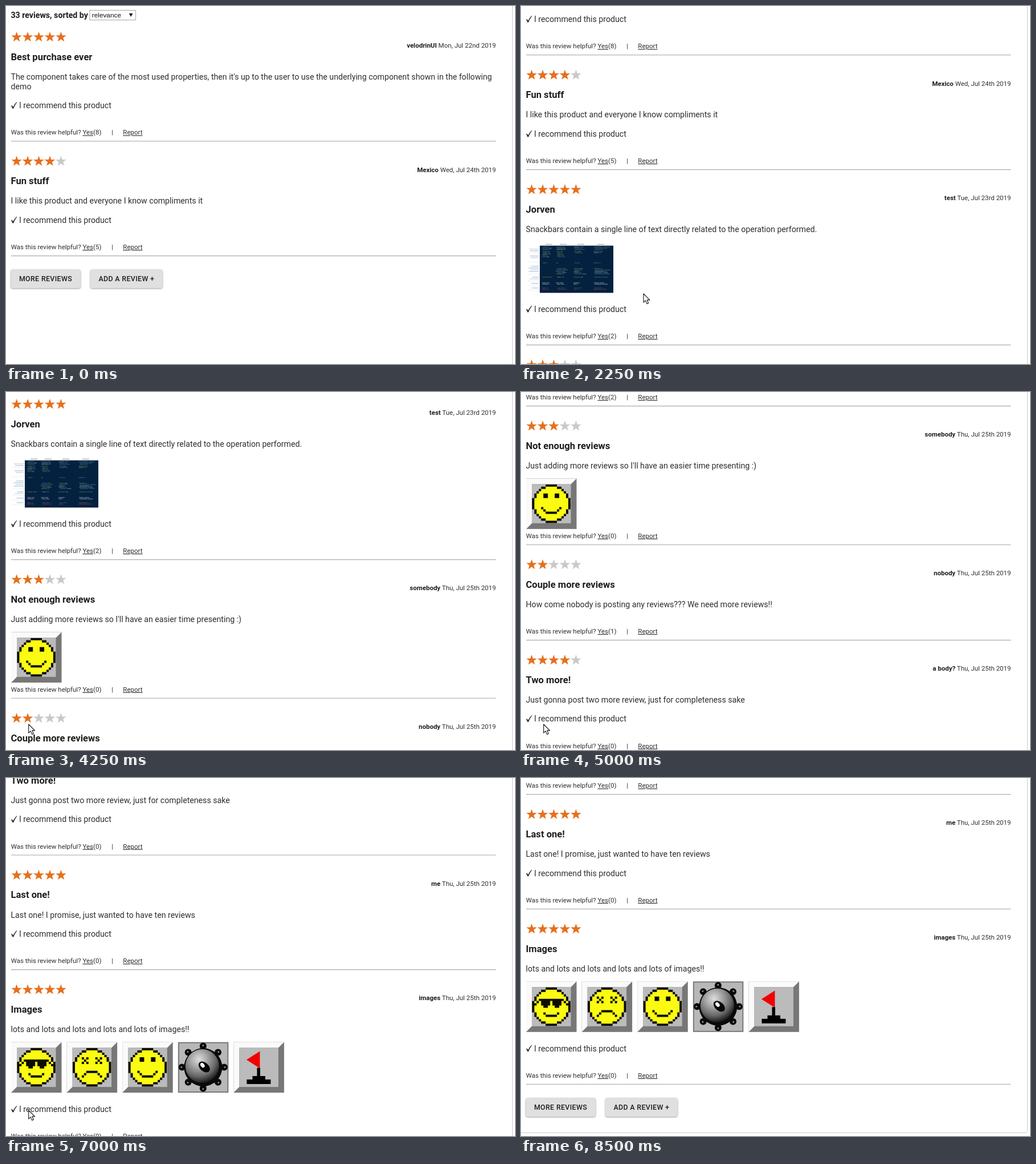
An HTML page that plays this animation: 893 px wide and 627 px high, repeating every 9.25 s.

```html
<!DOCTYPE html>
<html lang="en">
<head>
<meta charset="utf-8">
<title>Product reviews</title>
<style>
  html, body { margin: 0; width: 100%; height: 100%; overflow: hidden; background: #fff; }
  svg { display: block; }
  text { font: 14.17px Roboto, sans-serif; fill: #2e2e2e; }
  .bold { font-weight: 700; fill: #1e1e1e; }
  .head { font-size: 16.58px; }
  .small, .small tspan { font-size: 11.5px; }
  .link { text-decoration: underline; }
  .pick { font: 11.8px "Liberation Sans", Arial, sans-serif; fill: #111; }
  .label { font-size: 12.4px; font-weight: 500; letter-spacing: .354px; fill: #1e1e1e; }
  .btn { filter: drop-shadow(0 1.2px 1.4px rgba(0, 0, 0, .4)); }
</style>
</head>
<body>
<svg id="stage" width="893" height="627" viewBox="0 0 893 627">
  <defs>
    <radialGradient id="ball" cx=".4" cy=".3" r=".72">
      <stop offset="0" stop-color="#dedede"/>
      <stop offset=".35" stop-color="#a6a6a6"/>
      <stop offset=".7" stop-color="#686868"/>
      <stop offset="1" stop-color="#141414"/>
    </radialGradient>
  </defs>
  <g id="page"></g>
  <path id="cursor" d="M0 0V15.2L3.5 11.9L6 17.6L8.6 16.5L6.1 10.9H10.8Z"
    fill="#fff" stroke="#111" stroke-width="1.1" stroke-linejoin="round"/>
</svg>
<script>
const LOOP = 9250;
const ORANGE = '#e5701e', GREY = '#c9c9c9';

const reviews = [
  { stars: 5, head: 'Best purchase ever', who: 'velodrinUI', date: 'Mon, Jul 22nd 2019', ok: 1, yes: 8,
    body: ["The component takes care of the most used properties, then it's up to the user to use the underlying component shown in the following", 'demo'] },
  { stars: 4, head: 'Fun stuff', who: 'Mexico', date: 'Wed, Jul 24th 2019', ok: 1, yes: 5,
    body: ['I like this product and everyone I know compliments it'] },
  { stars: 5, head: 'Jorven', who: 'test', date: 'Tue, Jul 23rd 2019', ok: 1, yes: 2,
    body: ['Snackbars contain a single line of text directly related to the operation performed.'], pics: ['sheet'] },
  { stars: 3, head: 'Not enough reviews', who: 'somebody', date: 'Thu, Jul 25th 2019', ok: 0, yes: 0,
    body: ["Just adding more reviews so I'll have an easier time presenting :)"], pics: ['smile'] },
  { stars: 2, head: 'Couple more reviews', who: 'nobody', date: 'Thu, Jul 25th 2019', ok: 0, yes: 1,
    body: ['How come nobody is posting any reviews??? We need more reviews!!'] },
  { stars: 4, head: 'Two more!', who: 'a body?', date: 'Thu, Jul 25th 2019', ok: 1, yes: 0,
    body: ['Just gonna post two more review, just for completeness sake'] },
  { stars: 5, head: 'Last one!', who: 'me', date: 'Thu, Jul 25th 2019', ok: 1, yes: 0,
    body: ['Last one! I promise, just wanted to have ten reviews'] },
  { stars: 5, head: 'Images', who: 'images', date: 'Thu, Jul 25th 2019', ok: 1, yes: 0,
    body: ['lots and lots and lots and lots and lots of images!!'], pics: ['cool', 'dead', 'smile', 'mine', 'flag'] }
];

const rect = (x, y, w, h, fill, extra = '') =>
  `<rect x="${x}" y="${y}" width="${w}" height="${h}" fill="${fill}" ${extra}/>`;
const text = (x, y, str, cls = '', extra = '') => `<text x="${x}" y="${y}" class="${cls}" ${extra}>${str}</text>`;
const path = (d, fill, extra = '') => `<path d="${d}" fill="${fill}" ${extra}/>`;
const move = (x, y, body, scale = 1) => `<g transform="translate(${x} ${y}) scale(${scale})">${body}</g>`;

const star = (x, y, fill) =>
  move(x, y, path('m25 1 6 17h18l-14 11 5 17-15-10-15 10 5-17-14-11h18z', fill), .385);

// Raised grey tile, 88.5 px square
const tile = body => rect(0, 0, 88.5, 88.5, '#777') +
  path('M0 0H88.5L78.5 10H10V78.5L0 88.5Z', '#fafafa') + rect(10, 10, 68.5, 68.5, '#bbb') + body;

const cells = list => list.map(([x, y, w = 1, h = 1]) => `M${x} ${y}h${w}v${h}h${-w}z`).join('');

// Pixel face on a 17 x 17 grid
function face(features) {
  const inside = (x, y) => Math.hypot(x - 8, y - 8) < 8.4;
  const edge = [], skin = [];
  for (let y = 0; y < 17; y++) for (let x = 0; x < 17; x++) {
    if (!inside(x, y)) continue;
    const full = inside(x - 1, y) && inside(x + 1, y) && inside(x, y - 1) && inside(x, y + 1);
    (full ? skin : edge).push([x, y]);
  }
  return tile(move(10.4, 10.5, path(cells(skin), '#fbfb12') + path(cells([...edge, ...features]), '#0c0c00'), 3.97));
}

const mirror = list => list.flatMap(([x, y, w = 1, h = 1]) => [[x, y, w, h], [17 - x - w, y, w, h]]);
const cross = [[4, 4], [6, 4], [5, 5], [4, 6], [6, 6]];

function mine() {
  let s = rect(0, 0, 88.5, 88.5, '#777') + rect(2, 2, 84.5, 84.5, '#b8b8b8');
  const dot = (x, y, r, fill) => `<circle cx="${x}" cy="${y}" r="${r}" fill="${fill}"/>`;
  for (let i = 0; i < 8; i++) {
    const x = 37 * Math.cos(i * Math.PI / 4), y = 37 * Math.sin(i * Math.PI / 4);
    s += dot(44 + x, 44 + y, 6, '#0a0a0a') + dot(44 + x * 1.03, 44 + y * 1.03, 1.4, '#999');
  }
  return s + dot(44, 44, 33.5, '#0a0a0a') + dot(42.5, 42, 29.5, 'url(#ball)') +
    '<ellipse cx="46" cy="43.5" rx="11.5" ry="7.5" fill="#050505" transform="rotate(42 46 43.5)"/>' +
    '<ellipse cx="43" cy="40.5" rx="4.6" ry="3.2" fill="#f4f4f4" transform="rotate(50 43 40.5)"/>';
}

// Tiny code sheet: coloured dashes in four columns
function sheet() {
  let seed = 7, s = rect(24, 6.3, 129, 82.7, '#04213f');
  const rnd = () => (seed = seed * 16807 % 2147483647) / 2147483647;
  const tints = ['#8a9c4e', '#5d86b8', '#a8b4c0', '#4f9a80'];
  const dash = (x, y, w, fill) => { s += rect(x.toFixed(1), y, w.toFixed(1), 1, fill, 'opacity=".6"'); };
  const block = (x, y, rows, w, fill) => {
    for (let i = 0; i < rows; i++) {
      const part = w * (.35 + rnd() * .3), at = x + rnd() * 3;
      dash(at, y + i * 2.3, part, fill || tints[rnd() * 4 | 0]);
      dash(at + part + 1, y + i * 2.3, w * rnd() * .4, fill || tints[rnd() * 4 | 0]);
    }
  };
  [27, 52, 83, 118].forEach((x, i) => {
    const w = i === 3 ? 29 : 20;
    dash(x + 7, 3.5, 12, '#555');
    block(x, 8, 3, w);
    block(x, 16, i < 2 ? 5 : 2, w * .7);
    block(x, 36, 1, w * .5);
    if (i) block(x, 46, 5, w);
    block(x, 61, 1, w * .9);
    block(x, 71, 2, w * .8, '#dde3ea');
    block(x, 80, 2, w * .8, '#a0525c');
  });
  [12, 15, 24, 27, 42, 45, 48, 51, 61, 64, 72, 80].forEach((y, i) => {
    const w = 8 + rnd() * 11;
    dash(22 - w, y, w, i % 3 ? '#5d86b8' : '#8aa0a0');
  });
  [19, 35, 56, 68, 76, 84].forEach(y => { s += rect(2, y, 22, .5, '#dcdcdc'); });
  return s;
}

const pics = {
  sheet: sheet(),
  smile: face([...mirror([[5, 4, 2, 2], [4, 10], [5, 11]]), [6, 12, 5]]),
  dead: face([...mirror([...cross, [5, 11], [4, 12]]), [6, 10, 5]]),
  cool: face([...mirror([[4, 6, 4, 2], [5, 8, 2], [2, 6], [1, 7], [5, 11]]), [3, 5, 11], [6, 12, 5]]),
  mine: mine(),
  flag: tile(path('M46 16V46L22.5 31Z', '#f00000') + path('M41 45H46.5V59.5H55.5V65.5H65V73.5H23V65.5H33V59.5H41Z', '#000'))
};

// Returns the markup and the y of the closing rule
function review(r, y) {
  let s = '', line = y + 75.2;
  for (let i = 0; i < 5; i++) s += star(9 + 19.45 * i, y - 9, i < r.stars ? ORANGE : GREY);
  s += text(8.5, y + 41, r.head, 'bold head');
  s += text(859.5, y + 19.5, `<tspan class="bold">${r.who}</tspan> ${r.date}`, 'small', 'text-anchor="end"');
  r.body.forEach((str, i) => { s += text(8.5, line + 17 * i, str); });
  line += 17 * (r.body.length - 1);
  if (r.pics) {
    r.pics.forEach((p, i) => { s += move(9 + 97.6 * i, line + 17.5, pics[p]); });
    line += r.ok ? 106.4 : 75.6;
  }
  if (r.ok) {
    line += 33.4;
    s += move(9, line, path('M.2 -4.2L1.6 -5.1L3.4 -2.2Q6 -7.4 9.7 -11L10.3 -10.5Q6.4 -5.4 3.9 .7H2.7Z', '#1c1c1c'));
    s += text(23, line, 'I recommend this product');
  }
  line += 46.3;
  s += text(8.8, line, `Was this review helpful? <tspan class="link">Yes</tspan>(${r.yes})`, 'small');
  s += text(185.2, line, '|', 'small') + text(205.3, line, 'Report', 'small link');
  const rule = line + 11.7;
  s += rect(9, rule - .8, 850.5, 1, '#a2a2a2') + rect(9, rule + .2, 850.5, .8, '#e4e4e4');
  return [s, rule];
}

const page = document.getElementById('page');
const cursor = document.getElementById('cursor');
const rules = [];
let y = 53.5;
let html = '<path id="card" fill="none" stroke="#cacaca"/>' +
  text(8.5, 21, '33 reviews, sorted by', 'bold') +
  rect(147, 7.5, 80.5, 17, '#fff', 'stroke="#a6a6a6"') + text(150.8, 20, 'relevance', 'pick') +
  path('M215.8 13H222.4L219.1 19Z', '#111');
for (const r of reviews) {
  const [markup, rule] = review(r, y);
  html += `<g class="review">${markup}</g>`;
  rules.push(rule);
  y = rule + 34;
}
const button = (x, w, label, id) =>
  `<rect id="${id}" class="btn" x="${x}" width="${w}" height="32.6" rx="3.5" fill="#e0e0e0"/>` + text(x + 14.4, 20.6, label, 'label');
html += `<g id="buttons">${button(8.5, 122.3, 'MORE REVIEWS', 'more')}${button(148, 126.5, 'ADD A REVIEW +', 'add')}</g>`;
page.innerHTML = html;

const items = page.querySelectorAll('.review');
const buttons = document.getElementById('buttons');
const more = document.getElementById('more');
const card = document.getElementById('card');

// Each step changes only what it names: n reviews, scroll, cursor, hover
const steps = [
  [0, { n: 2, scroll: 0, at: null, hover: 0 }],
  [250, { at: [8, 374] }],
  [500, { at: [30, 432] }],
  [750, { at: [42, 469], hover: .5 }],
  [1000, { at: [46, 474], hover: 1 }],
  [1500, { n: 4, hover: 0 }],
  [1750, { at: [215, 504] }],
  [2250, { scroll: 151 }],
  [2500, { scroll: 290 }],
  [2750, { scroll: 399 }],
  [3000, { scroll: 451 }],
  [3500, { at: [104, 566], hover: .5 }],
  [3750, { at: [39.7, 582], hover: 1 }],
  [4250, { n: 6, hover: 0 }],
  [4750, { scroll: 560 }],
  [5000, { scroll: 720 }],
  [5250, { scroll: 818.8, hover: 1 }],
  [6000, { n: 8, hover: 0 }],
  [6250, { scroll: 919 }],
  [6500, { scroll: 1020 }],
  [6750, { scroll: 1130 }],
  [7000, { scroll: 1220 }],
  [7250, { scroll: 1300 }],
  [7500, { scroll: 1326.3, hover: 1 }],
  [7750, { at: [36, 578] }],
  [8000, { at: [22, 562] }],
  [8250, { at: [5, 510], hover: .5 }],
  [8500, { at: null, hover: 0 }]
];
const states = [];
steps.forEach(([t, change], i) => states.push({ ...states[i - 1], ...change, t }));

let shown;
function draw() {
  const t = performance.now() % LOOP;
  const s = states.findLast(k => k.t <= t);
  if (s !== shown) {
    shown = s;
    const rule = rules[s.n - 1], bottom = Math.max(700, rule + 84.8);
    items.forEach((el, i) => { el.style.display = i < s.n ? '' : 'none'; });
    page.setAttribute('transform', `translate(0 ${-s.scroll})`);
    buttons.setAttribute('transform', `translate(0 ${rule + 23.7})`);
    card.setAttribute('d', `M888.5 -9V${bottom - 4}q0 4 -4 4H-9`);
    const g = 224 - 11 * s.hover;
    more.setAttribute('fill', `rgb(${g},${g},${g})`);
    cursor.style.display = s.at ? '' : 'none';
    if (s.at) cursor.setAttribute('transform', `translate(${s.at})`);
  }
  requestAnimationFrame(draw);
}
draw();
</script>
</body>
</html>
```
